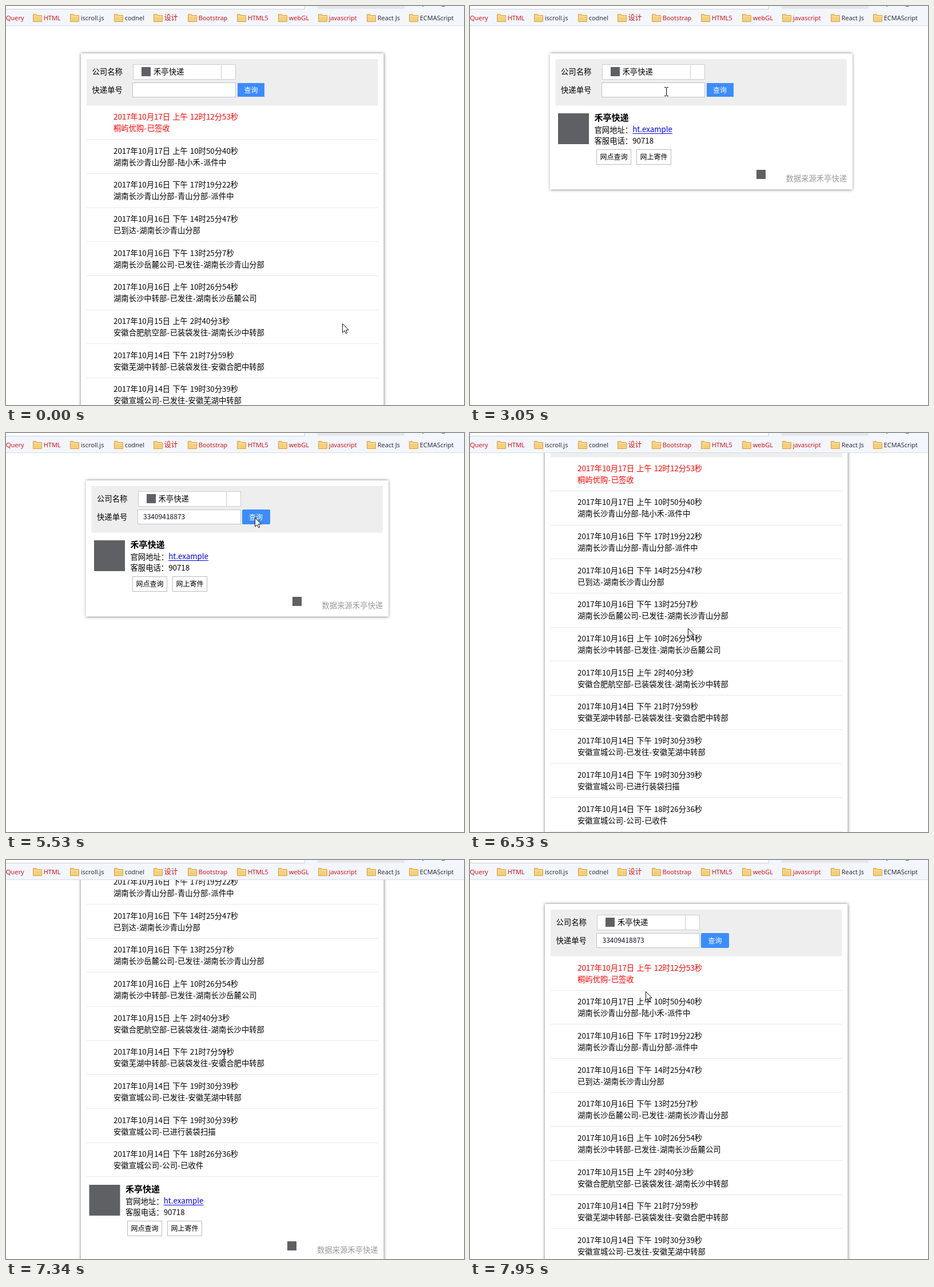
An HTML page with a canvas for the animation above (8 s loop, 801 px wide and 699 px high).

```html
<!DOCTYPE html>
<html lang="zh-CN">
<head>
<meta charset="utf-8">
<title>快递查询</title>
<style>
html, body { margin: 0; width: 100%; height: 100%; overflow: hidden; background: #fff; }
canvas { display: block; }
</style>
</head>
<body>
<canvas id="stage" width="801" height="699"></canvas>
<script>
const ctx = document.getElementById('stage').getContext('2d');
const W = 801, H = 699, LOOP = 8000;
const CJK = '"Noto Sans CJK SC", "Noto Sans CJK", sans-serif';
const UI = '"Open Sans", ' + CJK;
const BODY = 40 / 3, SMALL = 12;
const ROW = 59.67;
const BLUE = '#3b8cff', GREY = '#5f6064', RED = '#d2060d';

const RELOAD = 1500, PRESS = 5530, LOADED = 5600;

const company = '禾亭快递';
const rows = [
  ['17日 上午 12时12分53秒', '桐屿优购-已签收'],
  ['17日 上午 10时50分40秒', '湖南长沙青山分部-陆小禾-派件中'],
  ['16日 下午 17时19分22秒', '湖南长沙青山分部-青山分部-派件中'],
  ['16日 下午 14时25分47秒', '已到达-湖南长沙青山分部'],
  ['16日 下午 13时25分7秒', '湖南长沙岳麓公司-已发往-湖南长沙青山分部'],
  ['16日 上午 10时26分54秒', '湖南长沙中转部-已发往-湖南长沙岳麓公司'],
  ['15日 上午 2时40分3秒', '安徽合肥航空部-已装袋发往-湖南长沙中转部'],
  ['14日 下午 21时7分59秒', '安徽芜湖中转部-已装袋发往-安徽合肥中转部'],
  ['14日 下午 19时30分39秒', '安徽宣城公司-已发往-安徽芜湖中转部'],
  ['14日 下午 19时30分39秒', '安徽宣城公司-已进行装袋扫描'],
  ['14日 下午 18时26分36秒', '安徽宣城公司-公司-已收件']
];

const bookmarks = ['HTML', 'iscroll.js', 'codnel', '设计', 'Bootstrap', 'HTML5',
  'webGL', 'javascript', 'React Js', 'ECMAScript'];
const plainMarks = ['iscroll.js', 'codnel', 'React Js', 'ECMAScript'];

// Focus, paste, then two deletions
const edits = [
  { at: 2080, value: '' },
  { at: 3540, value: '3340941887365' },
  { at: 4230, value: '334094188736' },
  { at: 4610, value: '33409418873' }
];

const moves = [
  { from: 500, to: 850, x: 524, y: 211 },
  { from: 850, to: 1100, x: 205, y: 147 },
  { from: 1100, to: 1340, x: 430, y: 146 },
  { from: 1340, to: 1500, x: 507, y: 186 },
  { from: 1500, to: 2080, x: 343, y: 150 },
  { from: 3500, to: 4300, x: 359, y: 149 },
  { from: 4610, to: 5150, x: 435, y: 148 },
  { from: 5760, to: 6150, x: 381, y: 342 },
  { from: 7400, to: 7950, x: 307, y: 230 }
];

const folder = new Path2D('M.5 27.5V14.5H6L7.5 16.5H15.5V27.5Z');
const arrow = new Path2D('M0 0V15.5L3.6 12.2 6 17.3 8.3 16.3 6 11.3 10.6 11Z');

const between = (t, a, b) => t >= a && t < b;

function ease(t, from, to) {
  const k = Math.min(1, Math.max(0, (t - from) / (to - from)));
  return k * k * (3 - 2 * k);
}

const scrollAt = t => 300 * (ease(t, 6200, 6919) - ease(t, 7197, 8017));

function pointerAt(t) {
  let x = 588, y = 556;
  for (const m of moves) {
    const k = ease(t, m.from, m.to);
    x += (m.x - x) * k;
    y += (m.y - y) * k;
  }
  return [Math.round(x), Math.round(y)];
}

function rect(x, y, w, h, color) {
  ctx.fillStyle = color;
  ctx.fillRect(x, y, w, h);
}

function box(x, y, w, h, line) {
  rect(x, y, w, h, line);
  rect(x + 1, y + 1, w - 2, h - 2, '#fff');
}

function text(s, x, y, color = '#000', size = BODY, weight = 400, family = CJK) {
  ctx.font = `${weight} ${size}px ${family}`;
  ctx.fillStyle = color;
  ctx.fillText(s, x, y);
  return ctx.measureText(s).width;
}

// Hyphens in the list take 0.4 em
function joined(s, x, y, color) {
  s.split('-').forEach((part, i) => {
    if (i) {
      text('-', x + 0.3, y, color);
      x += BODY * 0.4;
    }
    x += text(part, x, y, color);
  });
}

function drawCard(t) {
  const listed = t < RELOAD || t >= LOADED;
  const scroll = Math.round(scrollAt(t) * 10) / 10;
  // Without a scrollbar the page centre moves right
  const dx = listed ? 0 : 8.5, bx = Math.round(dx);
  const top = 83 - Math.round(scroll);
  const listH = listed ? ROW * rows.length : 0;

  ctx.save();
  ctx.shadowColor = '#777';
  ctx.shadowBlur = 5;
  rect(131 + dx, top, 529.5, 238.5 + listH, '#fff');
  ctx.restore();

  rect(141 + dx, top + 10, 509.5, 81.5, '#eee');
  drawForm(t, dx, bx, top);
  if (listed) drawRows(scroll);
  drawInfo(dx, bx, Math.round(listH - scroll));
}

function drawForm(t, dx, bx, top) {
  text('公司名称', 150.5 + dx, top + 37);
  text('快递单号', 150.5 + dx, top + 69);

  box(222 + bx, top + 19, 180, 27, '#ccc');
  rect(376 + bx, top + 20, 1, 25, '#ccc');
  rect(237 + bx, top + 24, 16, 16, GREY);
  text(company, 258 + dx, top + 37);

  box(221 + bx, top + 51, 181, 26, '#c4c4c4');
  drawNumber(t, 231.5 + dx, top);
  drawSearch(t >= PRESS, 405 + bx, top + 52);
  text('查询', 416.5 + dx, top + 68.5, '#fff', SMALL);
}

function drawNumber(t, x, top) {
  const edit = edits.filter(e => t >= e.at).pop();
  if (!edit) return;
  const w = text(edit.value, x, top + 68, '#112', SMALL);
  const blinkOn = (t - edit.at) % 1000 < 490;
  if (t < 5150 && blinkOn) rect(Math.round(x + w), top + 56, 1, 15, '#000');
}

function drawSearch(focused, x, y) {
  const grow = focused ? 1 : 0;
  ctx.fillStyle = BLUE;
  ctx.beginPath();
  ctx.roundRect(x - grow, y - grow, 47 + 2 * grow, 24 + 2 * grow, 2 * grow);
  ctx.fill();
}

function drawRows(scroll) {
  rows.forEach(([date, place], i) => {
    const y = ROW * i - scroll;
    const color = i ? '#000' : '#f00';
    ctx.wordSpacing = '1px';
    text('2017年10月' + date, 188, Math.round(199 + y), color);
    ctx.wordSpacing = '0px';
    joined(place, 188, Math.round(219 + y), color);
    rect(141, Math.round(233.2 + y), 509.5, 1, '#e9e9e9');
  });
}

function drawInfo(dx, bx, dy) {
  const x = 209 + dx;
  rect(145.5 + dx, 188 + dy, 54, 54, GREY);
  text(company, x, 201 + dy, '#000', 15, 700);
  const lead = text('官网地址：', x, 222 + dy);
  const w = text('ht.example', x + lead, 221 + dy, '#00e');
  rect(x + lead, 223 + dy, w, 1, '#00e');
  text('客服电话：90718', x, 241 + dy);

  ['网点查询', '网上寄件'].forEach((label, i) => {
    const left = 212 + 70 * i + bx;
    box(left, 251 + dy, 61, 27, '#bbb');
    text(label, left + 6.5, 269 + dy, '#000', SMALL);
  });

  rect(492 + bx, 287 + dy, 16, 16, GREY);
  text('数据来源' + company, 544 + dx, 307 + dy, '#999');
}

function drawFolder(x) {
  ctx.save();
  ctx.translate(x, 0);
  ctx.fillStyle = '#f6cf78';
  ctx.strokeStyle = '#d5a243';
  ctx.fill(folder);
  ctx.stroke(folder);
  rect(2, 18, 13, 1, '#fbe6ae');
  ctx.restore();
}

function drawBar() {
  rect(0, 0, W, 35, '#f3f6fd');
  rect(0, 0, 523, 6, '#cdd0d6');
  rect(0, 0, 522, 5, '#fff');
  rect(545, 0, 152, 5, '#e5e7ec');
  rect(728, 0, 2, 1, '#667');
  rect(762, 0, 6, 1, '#667');
  rect(0, 34, W, 1, '#d6dae2');

  text('Query', 0, 25, RED, 11, 400, UI);
  let x = 47;
  for (const label of bookmarks) {
    const color = plainMarks.includes(label) ? '#223' : RED;
    const size = label === '设计' ? SMALL : 11;
    drawFolder(Math.round(x));
    x += 35.5 + text(label, Math.round(x) + 18.7, 25, color, size, 400, UI);
  }
}

function drawArrow(x, y) {
  ctx.save();
  ctx.translate(x + 0.5, y + 0.5);
  ctx.fillStyle = '#fff';
  ctx.strokeStyle = '#111';
  ctx.fill(arrow);
  ctx.stroke(arrow);
  ctx.restore();
}

function drawBeam(x, y) {
  rect(x, y - 7, 1, 14, '#000');
  for (const end of [y - 8, y + 7]) {
    rect(x - 3, end, 3, 1, '#000');
    rect(x + 1, end, 3, 1, '#000');
  }
}

function drawPointer(t) {
  // Key presses hide the pointer until it moves again
  if (between(t, 70, 850) || between(t, 3370, 3650)) return;
  const [x, y] = pointerAt(t);
  const inField = between(y, 134, 160) && between(x, 223, 411);
  const onText = between(t, 7250, 7420);
  if (inField || onText) drawBeam(x, y);
  else drawArrow(x, y);
}

const start = performance.now();
function loop() {
  const t = (performance.now() - start) % LOOP;
  rect(0, 0, W, H, '#fff');
  drawCard(t);
  drawBar();
  drawPointer(t);
  requestAnimationFrame(loop);
}
loop();
</script>
</body>
</html>
```
